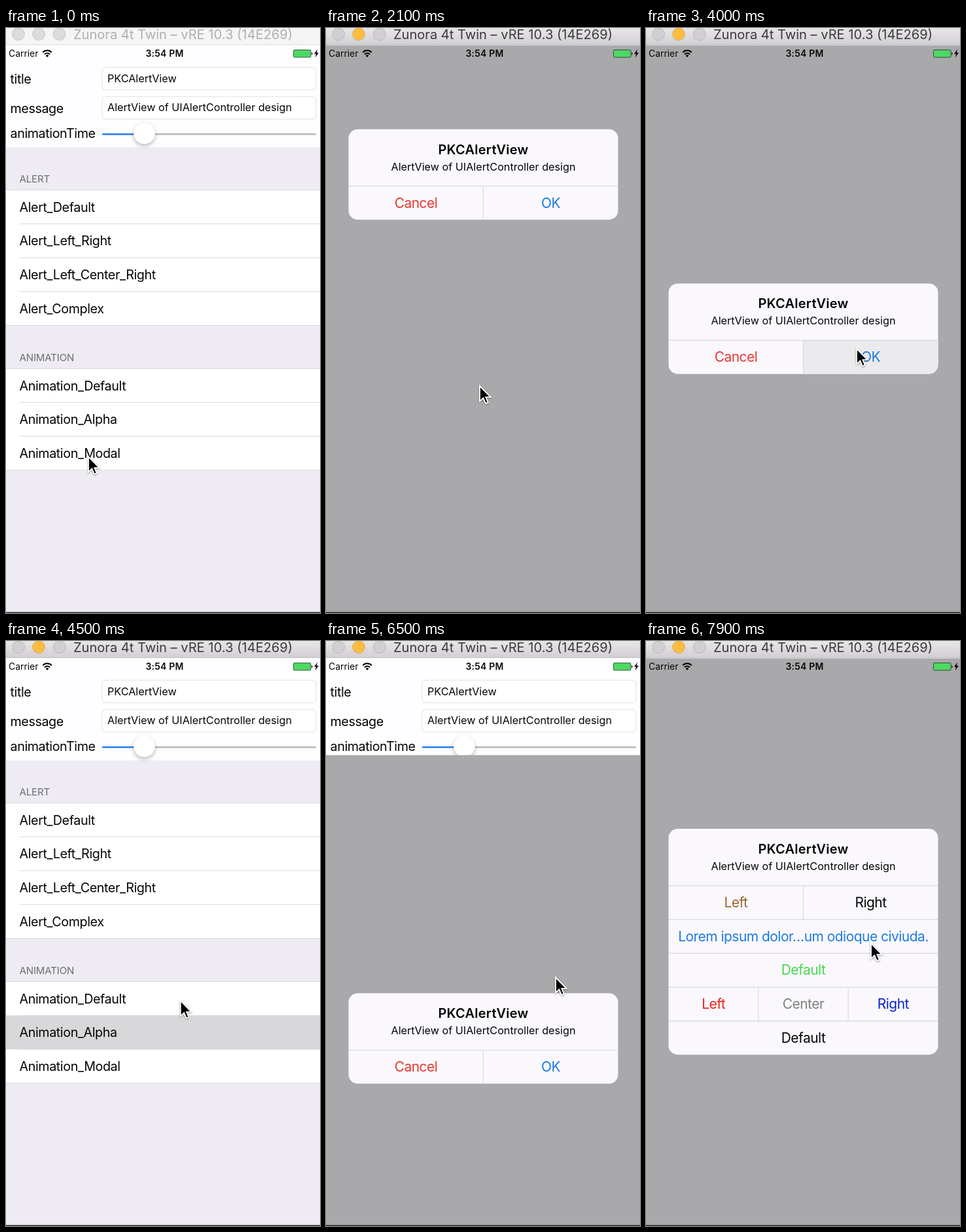
Write an HTML page that moves like this. It is 480x894 px and loops after 8 s.

```html
<!DOCTYPE html>
<html lang="en">
<head>
<meta charset="utf-8">
<title>Alert view demo</title>
<style>
  html, body { margin: 0; width: 100%; height: 100%; overflow: hidden; background: #efeef4; }
  svg { display: block; width: 100%; height: 100%; }
  text { font-family: Inter, Roboto, sans-serif; fill: #050505; white-space: pre; }
  .body { font-size: 19.7px; letter-spacing: -.02em; }
  .small { font-size: 16.2px; }
  .head { font-size: 15.07px; letter-spacing: -.01em; fill: #6d6d72; }
  .status { font-size: 13.9px; }
  .clock { font-size: 13.9px; font-weight: 600; letter-spacing: .02em; }
  .window { font-size: 20.1px; }
  .strong { font-size: 19.9px; font-weight: 600; letter-spacing: .015em; }
  .button { font-size: 20.9px; letter-spacing: -.023em; }
  .mid { text-anchor: middle; }
  .line { stroke: #d9d8dd; stroke-width: 1.1; }
</style>
</head>
<body>
<svg id="stage" viewBox="0 0 480 894" preserveAspectRatio="none"></svg>
<script>
const ROW = 51.75, SCREEN_TOP = 26.5, CENTER_Y = 459.5, LOOP = 8000, STEP = 100;

const label = (x, y, cls, str, fill) =>
  `<text x="${x}" y="${y}" class="${cls}"${fill ? ` style="fill:${fill}"` : ''}>${str}</text>`;
const box = (x, y, w, h, fill, extra = '') =>
  `<rect x="${x}" y="${y}" width="${w}" height="${h}" fill="${fill}" ${extra}/>`;
const line = (x1, y1, x2, y2) =>
  `<line x1="${x1}" y1="${y1}" x2="${x2}" y2="${y2}" class="line"/>`;

function field(y, name, value) {
  return label(6.5, y + 25, 'body', name) +
    box(147, y, 327, 34.5, '#fff', 'rx="5.5" stroke="#e2e2e6" stroke-width="1.1"') +
    label(155, y + 22.5, 'small', value);
}

function section(y, heading, rows) {
  const bottom = y + rows.length * ROW;
  let out = label(20.5, y - 11.5, 'head', heading) + box(0, y, 480, bottom - y, '#fff');
  rows.forEach((name, i) => {
    const top = y + i * ROW;
    out += line(i ? 20 : 0, top, 480, top) +
      box(0, top, 480, ROW, '#d8d7d9', `id="${name}" visibility="hidden"`) +
      label(20.5, top + 33, 'body', name);
  });
  return out + line(0, bottom, 480, bottom);
}

// Each row is a list of [caption, colour] buttons of equal width.
function alertBox(id, rows) {
  const height = 87 + rows.length * ROW - .5, top = CENTER_Y - height / 2;
  let out = box(34.5, top, 412, height, '#faf8fc', 'rx="14"') +
    label(240.5, top + 38, 'strong mid', 'PKCAlertView') +
    label(240.5, top + 63, 'small mid', 'AlertView of UIAlertController design');
  rows.forEach((buttons, r) => {
    const y = top + 87 + r * ROW, w = 412 / buttons.length;
    buttons.forEach(([caption, color], c) => {
      const x = 34.5 + c * w;
      if (caption === 'OK')
        out += `<path id="pressed" fill="#ebeaec" d="M${x} ${y}h${w}V${top + height - 14}a14 14 0 0 1-14 14H${x}z"/>`;
      if (c) out += line(x, y, x, Math.min(y + ROW, top + height));
      out += label(x + w / 2, y + 33, 'button mid', caption, color);
    });
    out += line(34.5, y, 446.5, y);
  });
  return `<g id="${id}">${out}</g>`;
}

const lights = (first, second) => [19, 50, 81.5].map((x, i) =>
  `<circle cx="${x}" cy="9.3" r="9.5" fill="${i === 1 ? second : first}" stroke="#0002"/>`).join('');

const titleBar = (id, fill, edge, color, first, second) => `<g id="${id}">` +
  box(0, 0, 480, 25.5, fill) + box(0, 25, 480, 1, edge) + lights(first, second) +
  label(270.5, 17, 'window mid', 'Zunora 4t Twin – vRE 10.3 (14E269)', color) + '</g>';

const statusBar = label(4, 44, 'status', 'Carrier') + label(242.5, 44, 'clock mid', '3:54 PM') + `
  <g fill="none" stroke="#000" stroke-width="2">
    <path d="M56.3 37.2a9.3 9.3 0 0 1 13.4 0M59 40.2a5.5 5.5 0 0 1 8 0"/>
  </g>
  <path d="M63 44.8l-2.3-2.6a3.2 3.2 0 0 1 4.6 0z"/>
  <rect x="439.5" y="33.5" width="26.5" height="11.3" rx="1.5" fill="#4cd964" stroke="#0009"/>
  <path d="M467 37v4.5q1.6-.6 1.6-2.2t-1.6-2.3z" fill="#333"/>
  <path d="M476 32.5l-5 7h3l-1.4 5.5 5.4-7.2h-3.2z"/>`;

const slider = box(147, 161, 327, 2.4, '#b7b7b9', 'rx="1.2"') +
  box(147, 161, 64, 2.4, '#2a84f0', 'rx="1.2"') +
  '<circle cx="211.5" cy="161" r="16.3" fill="#fff" style="filter:drop-shadow(0 3px 3px #0004)"/>';

const stage = document.getElementById('stage');
stage.innerHTML = `
  <defs><linearGradient id="chrome" x2="0" y2="1">
    <stop stop-color="#e8e6e8"/><stop offset="1" stop-color="#d1cfd1"/>
  </linearGradient></defs>` +
  box(0, 0, 480, 894, '#eeecf2') + box(0, 25, 480, 157.5, '#fefdff') +
  field(60, 'title', 'PKCAlertView') +
  field(104.7, 'message', 'AlertView of UIAlertController design') +
  label(6.5, 168, 'body', 'animationTime') + slider +
  section(247.5, 'ALERT', ['Alert_Default', 'Alert_Left_Right', 'Alert_Left_Center_Right', 'Alert_Complex']) +
  section(520.5, 'ANIMATION', ['Animation_Default', 'Animation_Alpha', 'Animation_Modal']) +
  '<g id="overlay">' + box(0, SCREEN_TOP, 480, 894, '#a9a8aa') +
  alertBox('simple', [[['Cancel', '#e5372f'], ['OK', '#1a7ae5']]]) +
  alertBox('complex', [
    [['Left', '#97632c'], ['Right', '#050505']],
    [['Lorem ipsum dolor…um odioque civiuda.', '#1a7ae5']],
    [['Default', '#46d84c']],
    [['Left', '#f01d1a'], ['Center', '#808080'], ['Right', '#0a22cc']],
    [['Default', '#050505']]
  ]) + '</g>' + statusBar +
  titleBar('inactive', '#f6f5f6', '#dddcde', '#b0aeb0', '#dddbdd', '#dddbdd') +
  titleBar('active', 'url(#chrome)', '#c3c1c4', '#3c3a3c', '#d1cfd1', '#fdbd40') +
  box(0, 892.6, 480, 1.4, '#1c1c1e') +
  `<path id="cursor" d="M0 0V23.5L5.4 18.6 9 26.8 12.8 25.2 9.3 17.2H16.6Z" stroke="#fff"
    stroke-width="1.8" style="filter:drop-shadow(0 1.5px 1.2px #0006)"/>`;

const el = id => document.getElementById(id);
const show = (id, on) => el(id).setAttribute('visibility', on ? 'inherit' : 'hidden');
const clamp = x => Math.max(0, Math.min(1, x));
const easeInOut = x => (1 - Math.cos(Math.PI * x)) / 2;
const easeOut = x => 1 - (1 - x) ** 3;

const visits = [
  { row: 'Animation_Default', tap: 800, open: 900, close: 1908, time: 400, ease: easeInOut, style: 'drop', alert: 'simple' },
  { row: 'Animation_Alpha', tap: 3000, open: 3080, close: 4080, time: 300, ease: easeInOut, style: 'fade', alert: 'simple' },
  { row: 'Animation_Modal', tap: 5400, open: 5475.4, close: 6469.8, time: 500, ease: easeOut, style: 'modal', alert: 'simple' },
  { row: 'Alert_Complex', tap: 7300, open: 7380, close: 9000, time: 400, ease: easeInOut, style: 'drop', alert: 'complex' }
];

// [time, x, y] of the pointer tip
const pointer = [
  [300, 126, 655], [500, 133, 548], [900, 133, 548], [1650, 322, 490], [1850, 322, 490],
  [2100, 235, 547], [2450, 150, 600], [3100, 150, 600], [3700, 322, 490], [4150, 322, 490],
  [5100, 172, 652], [5550, 172, 652], [6200, 335, 496], [6400, 335, 496], [6500, 351, 514],
  [7100, 300, 424], [7450, 300, 424], [7900, 344, 462]
];

function pointerAt(t) {
  const next = pointer.findIndex(key => key[0] > t);
  if (next === 0) return pointer[0].slice(1);
  if (next < 0) return pointer.at(-1).slice(1);
  const [t0, x0, y0] = pointer[next - 1], [t1, x1, y1] = pointer[next];
  const k = (t - t0) / (t1 - t0);
  return [x0 + (x1 - x0) * k, y0 + (y1 - y0) * k];
}

function draw(t) {
  show('active', t >= 800);
  show('inactive', t < 800);

  const visit = visits.filter(v => t >= v.tap).at(-1);
  visits.forEach(v => show(v.row, v === visit));
  const shown = visit && t >= visit.open && t < visit.close + visit.time;
  show('overlay', shown);
  if (shown) {
    const { open, close, time, ease, style, alert } = visit;
    const away = 1 - ease(clamp((t - open) / time)) + ease(clamp((t - close) / time));
    const slide = style === 'modal' ? away * (894 - SCREEN_TOP) : 0;
    const lift = style === 'drop' ? -away * (alert === 'simple' ? 503 : 606) : 0;
    el('overlay').setAttribute('transform', `translate(0 ${slide})`);
    el('overlay').setAttribute('opacity', style === 'fade' ? 1 - away : 1);
    el(alert).setAttribute('transform', `translate(0 ${lift})`);
    show('simple', alert === 'simple');
    show('complex', alert === 'complex');
    show('pressed', alert === 'simple' && t >= close - 150 && t < close);
  }
  el('cursor').setAttribute('transform', `translate(${pointerAt(t)})`);
}

const start = performance.now();
function tick() {
  const t = (performance.now() - start) % LOOP;
  draw(Math.floor(t / STEP) * STEP);
  requestAnimationFrame(tick);
}
tick();
</script>
</body>
</html>
```
